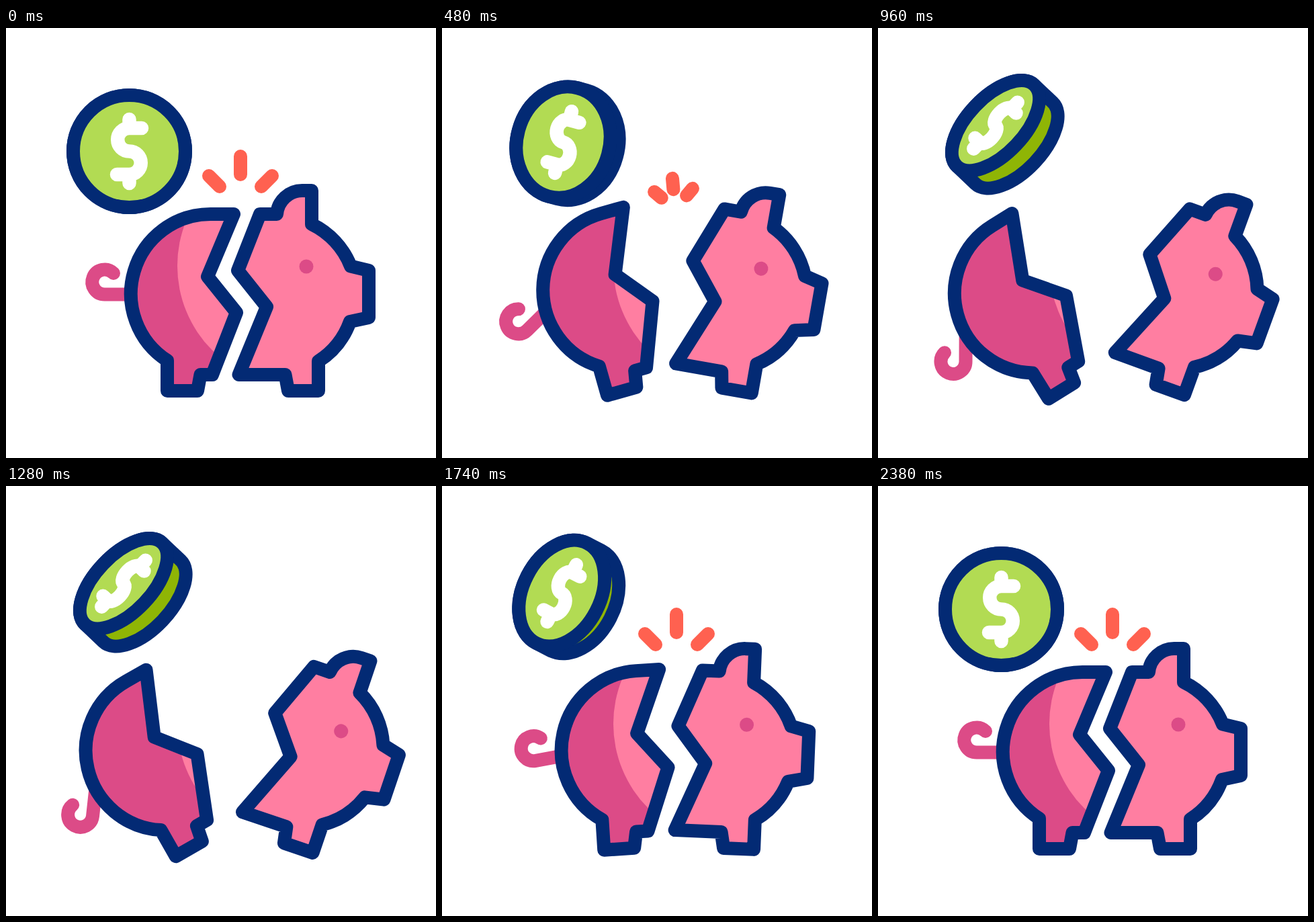
Animation of 640 by 640 pixels, one loop 2400 ms. Source, as an HTML page:

```html
<!DOCTYPE html>
<html lang="en">
<head>
<meta charset="utf-8">
<title>Broken piggy bank</title>
<style>
html, body { margin: 0; width: 100%; height: 100%; overflow: hidden; background: #fff; }
svg { display: block; width: 100%; height: 100%; }
.line { stroke: #032a74; stroke-width: 20; stroke-linejoin: round; stroke-linecap: round; }
.mark { fill: none; stroke-width: 20; stroke-linejoin: round; stroke-linecap: round; }
</style>
</head>
<body>
<svg viewBox="0 0 640 640">
  <defs>
    <path id="rear" d="M339 277H304.5A118.5 118.5 0 0 0 240 495V540H285L289.5 516H307L343 423.5L300 370Z"/>
    <clipPath id="rearClip"><use id="rearMask" href="#rear"/></clipPath>
  </defs>

  <path id="sparks" class="mark" stroke="#ff6150"/>

  <path id="tail" class="mark" stroke="#dc4b87" d="M184 396.5H147A18.5 18.5 0 1 1 160 365"/>
  <g clip-path="url(#rearClip)">
    <rect width="640" height="640" fill="#dc4b87"/>
    <circle cx="433" cy="354" r="178" fill="#ff7ea1"/>
  </g>
  <use id="rearLine" class="line" href="#rear" fill="none"/>

  <g id="front">
    <path class="line" fill="#ff7ea1" d="M378 277L345 361L388 415L346.500 516H415.500L420 540H465V496A117 117 0 0 0 512 437L540 431V361L513 354.500A117 117 0 0 0 455 292V242H441A38 38 0 0 0 403 277Z"/>
    <circle cx="447" cy="355" r="10.5" fill="#dc4b87"/>
  </g>

  <g id="coin">
    <path id="rim" class="line" fill="#8fb505"/>
    <ellipse id="face" class="line" ry="83.5" fill="#b2db53"/>
    <path id="dollar" class="mark" stroke="#fff" style="stroke-width:20.5"/>
  </g>
</svg>
<script>
const LOOP = 2400, R = 83.5;
const el = id => document.getElementById(id);
const set = (id, name, value) => el(id).setAttribute(name, value);

const ease = (t, from, to) => {
  const p = Math.min(1, Math.max(0, (t - from) / (to - from)));
  return p * p * (3 - 2 * p);
};
// Rises over a..b, falls over c..d
const swing = (t, a, b, c, d) => ease(t, a, b) - ease(t, c, d);

function drawPig(t) {
  const u = swing(t, 200, 763, 1165, 1895);
  const rear = `rotate(${-31.8 * u} 267.5 521.5)`;
  set('rearMask', 'transform', rear);
  set('rearLine', 'transform', rear);
  set('tail', 'transform', `${rear} rotate(${-58 * u} 184 396.5)`);
  set('front', 'transform', `rotate(${20 * u} 442.8 517.3)`);
}

function drawCoin(t) {
  const w = swing(t, 213, 882, 1440, 2160);
  const b = R - 41.5 * w, depth = 38 * w, k = b / R, r = 17.25;
  set('coin', 'transform',
    `translate(${183.5 - 8.5 * w} ${183.5 - 38.3 * w}) rotate(${43.5 * w})`);
  set('rim', 'd',
    `M0 ${-R}H${depth}A${b} ${R} 0 0 1 ${depth} ${R}H0A${b} ${R} 0 0 1 0 ${-R}Z`);
  set('face', 'rx', b);
  set('dollar', 'd',
    `M${18.5 * k} ${-2 * r}H0A${r * k} ${r} 0 0 0 0 0A${r * k} ${r} 0 0 1 0 ${2 * r}H${-18.5 * k}` +
    `M0 -47.500V${-2 * r}M0 ${2 * r}V47.500`);
}

function drawSparks(t) {
  const s = 1 - ease(t, 0, 180) + swing(t, 400, 540, 560, 760) + ease(t, 1440, 1660);
  const turn = -13 * (1 - s) * Math.PI / 180;
  const cos = Math.cos(turn) * s, sin = Math.sin(turn) * s;
  const at = (x, y) =>
    `${349 - 4 * (1 - s) + x * cos - y * sin} ${274 + x * sin + y * cos}`;
  const ray = (x1, y1, x2, y2) => `M${at(x1, y1)}L${at(x2, y2)}`;
  set('sparks', 'd',
    ray(-47, -54, -31, -38) + ray(0, -83, 0, -56) + ray(47, -54, 31, -38));
  set('sparks', 'visibility', s > 0.03 ? 'visible' : 'hidden');
}

function draw(now) {
  const t = now % LOOP;
  drawPig(t);
  drawCoin(t);
  drawSparks(t);
}

let start;
function tick(now) {
  start ??= now;
  draw(now - start);
  requestAnimationFrame(tick);
}
draw(0);
requestAnimationFrame(tick);
</script>
</body>
</html>
```
